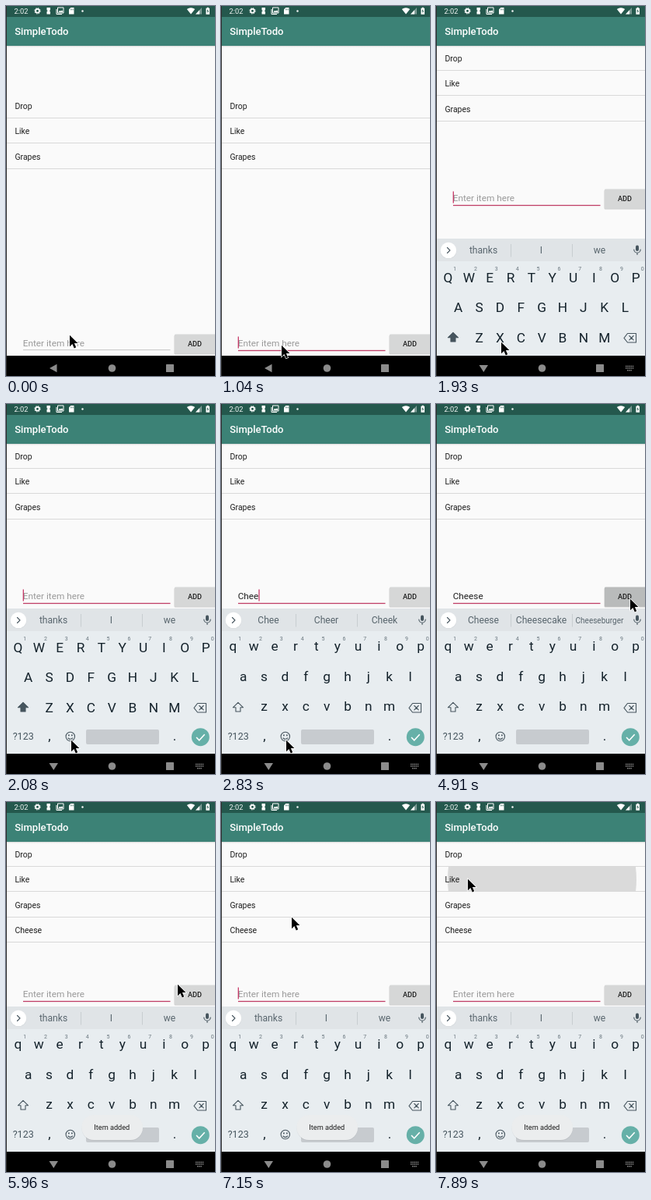
An HTML page for the animation above (8000 ms loop, 269 px wide and 474 px high).

```html
<!DOCTYPE html>
<html lang="en">
<head>
<meta charset="utf-8">
<title>SimpleTodo</title>
<style>
  html, body { margin: 0; width: 100%; height: 100%; overflow: hidden; background: #fafafa; }
  svg { display: block; width: 100vw; height: 100vh; font-family: Roboto, "Noto Sans", sans-serif; }
  .row { font-size: 10.5px; fill: #1f1f1f; }
  .field { font-size: 11.8px; }
  .mid { text-anchor: middle; }
  .key { font-size: 17.3px; fill: #14222b; }
  .digit { font-size: 7px; fill: #68757d; }
  .sugg { font-size: 12.1px; fill: #58656d; }
  .line { fill: none; stroke: #46555e; stroke-width: 1.1; stroke-linejoin: round; stroke-linecap: round; }
</style>
</head>
<body>
<svg viewBox="0 0 269 474" preserveAspectRatio="none">
  <defs>
    <linearGradient id="shade" x2="0" y2="1">
      <stop offset="0" stop-color="#000" stop-opacity=".14"/>
      <stop offset="1" stop-color="#000" stop-opacity="0"/>
    </linearGradient>
    <clipPath id="rowClip"><rect y="83" width="269" height="31"/></clipPath>
    <clipPath id="kbClip"><rect y="51" width="269" height="397"/></clipPath>
  </defs>
  <rect width="269" height="474" fill="#fafafa"/>

  <circle id="ripple" cx="136.5" cy="99" r="121.5" fill="#dadada" clip-path="url(#rowClip)"/>
  <g id="list"></g>

  <rect y="51" width="269" height="2" fill="url(#shade)"/>
  <rect y="14" width="269" height="37" fill="#3c8276"/>
  <text x="11.2" y="37" font-size="13.1" font-weight="500" fill="#fff">SimpleTodo</text>

  <g fill="#fff">
    <rect width="269" height="14" fill="#24584d"/>
    <text x="10.5" y="10" font-size="9.3" fill="#f1f6f4">2:02</text>
    <circle cx="40.5" cy="6.3" r="2.4" fill="none" stroke="#fff" stroke-width="1.7"/>
    <circle cx="40.5" cy="6.3" r="3.7" fill="none" stroke="#fff" stroke-width="1" stroke-dasharray="1.5 1.4"/>
    <path d="M52.5 2h4.5v3.5h-.8v1.5h.8v3.5h-4.5v-3.5h.8v-1.5h-.8z"/>
    <path d="M65 4v6.5h7" fill="none" stroke="#fff"/>
    <path d="M66.5 2h7.5v7h-7.5z" fill="none" stroke="#fff"/>
    <path d="M67.5 8l2-2.5 1.3 1.5 1.2-2 1.5 3z"/>
    <path d="M83.3 2h4.2v8.5h-6.5v-6z"/>
    <path d="M83.5 3.5v1.8m1.4-1.8v1.8m1.4-1.8v1.8" stroke="#24584d" stroke-width=".6"/>
    <circle cx="98.5" cy="6.5" r="1.2"/>
    <path d="M232.8 4Q238 .5 243.2 4L238 10.5z"/>
    <path d="M252 2v8.5h-8z" fill-opacity=".4"/>
    <path d="M249 5.2v5.3h-5z"/>
    <path d="M258.7 1.7h2v1h1.3v8h-4.6v-8h1.3z"/>
    <path d="M260 4l-1.5 3h1.1v2.5l1.4-3.2h-1z" fill="#24584d"/>
  </g>

  <g id="entry">
    <text id="typed" class="field" x="21.7" y="436"></text>
    <rect id="under" x="22" width="189.5"/>
    <rect id="caret" y="423.5" width="1.3" height="15" fill="#c93d6b"/>
    <rect x="216.5" y="421.3" width="54" height="25.2" rx="1.5" fill="#000" fill-opacity=".18"/>
    <rect id="button" x="217" y="420.5" width="54" height="25.3" rx="1.3"/>
    <text class="mid" x="243" y="436" font-size="9.16" font-weight="500" fill="#1c1c1c">ADD</text>
  </g>

  <g clip-path="url(#kbClip)">
  <g id="board">
    <rect y="262" width="269" height="186" fill="#e8edf0"/>
    <rect y="262" width="269" height="29" fill="#e0e4e7"/>
    <circle cx="16" cy="277.5" r="10.5" fill="#d0d5d8"/>
    <circle cx="16" cy="277" r="10.3" fill="#fff"/>
    <path class="line" d="M14.5 273.5l3.5 3.5-3.5 3.5"/>
    <path d="M96.5 269v16.5M175.5 269v16.5" stroke="#c8cdd0"/>
    <g id="suggs"></g>
    <rect x="257" y="270.5" width="4" height="7.5" rx="2" fill="#46555e"/>
    <path class="line" d="M254.8 276a4.2 4.2 0 0 0 8.4 0M259 280.3v2.2"/>
    <g id="keys"></g>
    <path id="shift" class="line" d="M22 382.3l6.6 6.5h-3.6v5.2h-6v-5.2h-3.6z"/>
    <path class="line" d="M246.5 383.5h11v11.5h-11l-4.5-5.7zM248.8 386.5l5.4 5.4m0-5.4l-5.4 5.4"/>
    <text class="mid" x="22.2" y="430.3" font-size="12.5" fill="#46555e">?123</text>
    <text class="mid key" x="56" y="431">,</text>
    <text class="mid key" x="217" y="431">.</text>
    <circle class="line" cx="82.8" cy="426" r="5.7"/>
    <path class="line" d="M80 428q2.8 2.8 5.6 0"/>
    <path d="M80 423.5h1.7v1.7h-1.7zM84 423.5h1.7v1.7h-1.7z" fill="#46555e"/>
    <rect x="103" y="417" width="94" height="19" rx="2" fill="#c7cbcf"/>
    <circle cx="250.3" cy="426.7" r="11.5" fill="#66b0a8"/>
    <path d="M245 427l3.7 3.8 7-7.6" fill="none" stroke="#fff" stroke-width="1.5"/>
  </g>
  </g>

  <g id="toast">
    <rect x="97.5" y="402" width="78.5" height="32" rx="15.5" fill="#000" fill-opacity=".06"/>
    <rect x="97.5" y="401" width="78.5" height="32" rx="15.5" fill="#ebedee"/>
    <text class="mid" x="136.3" y="420" font-size="9.16" fill="#1c1c1c">Item added</text>
  </g>

  <rect y="448" width="269" height="26"/>
  <g fill="#8b8b8b">
    <path id="back"/>
    <circle cx="136.5" cy="464" r="4.8"/>
    <rect x="206" y="459" width="10" height="10" rx=".6"/>
    <path id="kbIcon" d="M244 461.5h10.5M244 464h10.5M246 466.8h6.5" stroke="#8b8b8b"
      stroke-width="1.4" stroke-dasharray="1.4 .8"/>
  </g>
  <rect width="1" height="474" fill="#2c2c2c"/>
  <path id="mouse" d="M0 .7V15.2L3.4 12.1 5.8 17.4 8.2 16.3 5.9 11.1H10.4Z"
    stroke="#fff" stroke-width="1.4" paint-order="stroke"/>
</svg>

<script>
const LOOP = 8000;
const $ = id => document.getElementById(id);
const set = (el, attrs) => { for (const k in attrs) el.setAttribute(k, attrs[k]); };
const show = (id, on) => { $(id).style.visibility = on ? 'visible' : 'hidden'; };

function add(parent, tag, attrs, text = '') {
  const el = document.createElementNS('http://www.w3.org/2000/svg', tag);
  set(el, attrs);
  el.textContent = text;
  return $(parent).appendChild(el);
}

const rows = ['Drop', 'Like', 'Grapes', 'Cheese'].map((name, i) => {
  const y = Math.round(143 + 32.3 * i);
  return [
    add('list', 'text', { class: 'row', x: 11.4, y: y - 11 }, name),
    add('list', 'rect', { x: 1, y, width: 268, height: 1, fill: '#d9d9d9' })
  ];
});

const keys = [];
[['QWERTYUIOP', 15.5, 317.5], ['ASDFGHJKL', 28.7, 356.3], ['ZXCVBNM', 55.6, 395]]
  .forEach(([letters, x, y], row) => [...letters].forEach((ch, i) => {
    const cx = x + 26.85 * i;
    keys.push({ ch, y, el: add('keys', 'text', { class: 'mid key', x: cx }) });
    if (!row) add('keys', 'text', { class: 'mid digit', x: cx + 8.6, y: 302.5 }, (i + 1) % 10);
  }));

const suggs = [61, 135.5, 210.5].map(x => add('suggs', 'text', { class: 'mid sugg', x, y: 281 }));

const IDLE = ['thanks', 'I', 'we'];
const GREY = '#d6d7d7';
const start = {
  mouse: [82, 421], text: '', caret: 0, focus: 0, ime: 0, up: 0, slide: 200, caps: 1,
  words: IDLE, button: GREY, toast: 0, items: 3, ripple: 0
};

// Each step: time in ms, then whatever changes at that time.
const steps = [
  [600, { mouse: [78, 433] }],
  [890, { mouse: [78, 434], focus: 1 }],
  [1040, { caret: 1 }],
  [1190, { mouse: [80, 433] }],
  [1330, { mouse: [82, 432] }],
  [1480, { mouse: [84, 430], caret: 0 }],
  [1630, { ime: 1 }],
  [1930, { up: 1, slide: 36, caret: 1 }],
  [2080, { slide: 0 }],
  [2230, { text: 'C', caps: 0, words: ['C', 'Can', 'Call'] }],
  [2380, { text: 'Che', words: ['Che', 'Check', 'Chest'] }],
  [2830, { text: 'Chee', words: ['Chee', 'Cheer', 'Cheek'] }],
  [2980, { text: 'Chees', words: ['Chees', 'Cheese', 'Cheesy'] }],
  [3270, { text: 'Cheese', words: ['Cheese', 'Cheesecake', 'Cheeseburger'] }],
  [3570, { mouse: null }],
  [3720, { caret: 0 }],
  [4170, { caret: 1 }],
  [4320, { mouse: [258, 250] }],
  [4470, { mouse: [250, 249], caret: 0 }],
  [4760, { button: '#c8caca' }],
  [4910, { button: '#b9bbbb' }],
  [5060, { button: '#c6c8c8', text: '', words: IDLE, items: 4, caret: 1 }],
  [5210, { button: GREY, toast: .25 }],
  [5360, { toast: .5 }],
  [5510, { toast: .8, caret: 0 }],
  [5660, { toast: 1 }],
  [5810, { mouse: [236, 240] }],
  [5960, { mouse: [221, 233] }],
  [6110, { mouse: [199, 223], caret: 1 }],
  [6260, { mouse: [177, 214] }],
  [6410, { mouse: [158, 207] }],
  [6560, { mouse: [147, 204], caret: 0 }],
  [7000, { mouse: [122, 179], caret: 1 }],
  [7150, { mouse: [91, 147] }],
  [7300, { mouse: [62, 118] }],
  [7450, { mouse: [46, 102] }],
  [7600, { mouse: [41, 98], caret: 0 }],
  [7890, { ripple: 1 }]
];

function draw(s) {
  show('mouse', s.mouse);
  if (s.mouse) set($('mouse'), { transform: `translate(${s.mouse})` });

  set($('list'), { transform: `translate(0 ${s.up ? -61 : 0})` });
  set($('entry'), { transform: `translate(0 ${s.up ? -186 : 0})` });
  rows.forEach((row, i) => row.forEach(el => { el.style.display = i < s.items ? '' : 'none'; }));
  show('ripple', s.ripple);

  const typed = $('typed');
  typed.textContent = s.text || 'Enter item here';
  set(typed, { fill: s.text ? '#1f1f1f' : '#9a9a9a' });
  set($('caret'), { x: 21.7 + (s.text ? typed.getComputedTextLength() : 0) });
  show('caret', s.caret);
  set($('under'), s.focus
    ? { y: 440.8, height: 1.3, fill: '#c04068' }
    : { y: 440.3, height: .8, fill: '#b8b8b8' });
  set($('button'), { fill: s.button });

  set($('board'), { transform: `translate(0 ${s.slide})` });
  for (const k of keys) {
    k.el.textContent = s.caps ? k.ch : k.ch.toLowerCase();
    set(k.el, { y: s.caps ? k.y : k.y - 1.8 });
  }
  $('shift').style.fill = s.caps ? '#46555e' : 'none';
  suggs.forEach((el, i) => {
    el.textContent = s.words[i];
    el.style.fontSize = s.words[i].length > 10 ? '10px' : '';
  });

  set($('toast'), { opacity: s.toast });
  set($('back'), { d: s.ime ? 'M55.5 460h11.5l-5.7 9z' : 'M65.5 458.8v10.4l-9.5-5.2z' });
  show('kbIcon', s.ime);
}

const t0 = performance.now();
let last = -1;
function tick() {
  const t = (performance.now() - t0) % LOOP;
  const past = steps.filter(([at]) => at <= t);
  if (past.length !== last) {
    last = past.length;
    draw(Object.assign({}, start, ...past.map(([, change]) => change)));
  }
  requestAnimationFrame(tick);
}
tick();
</script>
</body>
</html>
```
